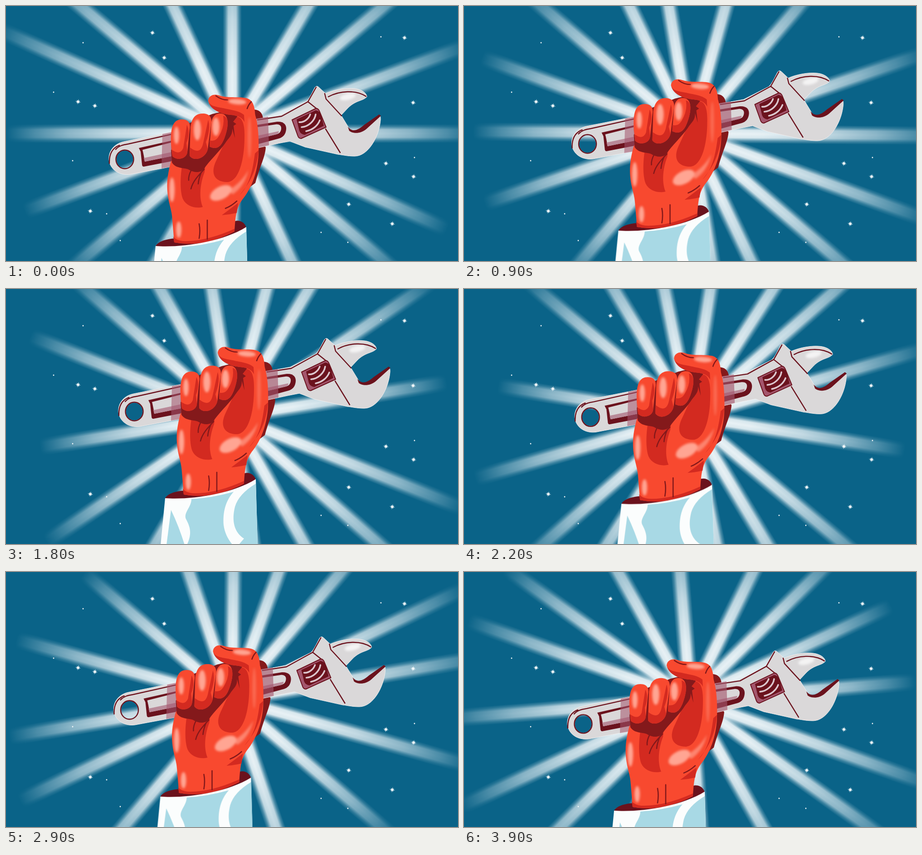
An HTML page for the animation above (4 s loop, 997x562 px).

```html
<!DOCTYPE html>
<html lang="en">
<head>
<meta charset="utf-8">
<title>Raised wrench</title>
<style>
  html, body { margin: 0; width: 100%; height: 100%; overflow: hidden; background: #0a6388; }
  svg { display: block; width: 997px; height: 562px; }
  .steel { fill: #dad8d9; }
  .ink { fill: #6b121d; }
  .line { fill: none; stroke: #6b121d; stroke-width: 2.4; stroke-linecap: round; stroke-linejoin: round; }
  .mauve { fill: #a4566d; }
  .red { fill: #f8492f; }
  .shade { fill: #d32a20; }
  .deep { fill: #84191b; }
  .crease { fill: none; stroke: #84191b; stroke-width: 2.6; stroke-linecap: round; }
  .glow { fill: #ffa593; filter: url(#soft); }
  .cloth { fill: #a8d9e5; }
</style>
</head>
<body>
<svg viewBox="0 0 997 562" xmlns="http://www.w3.org/2000/svg">
  <defs>
    <linearGradient id="beam" x1="0" y1="0" x2="0" y2="1">
      <stop offset="0" stop-color="#eef5f8" stop-opacity="0"/>
      <stop offset=".14" stop-color="#eef5f8" stop-opacity=".34"/>
      <stop offset=".3" stop-color="#eef5f8" stop-opacity=".93"/>
      <stop offset=".5" stop-color="#eef5f8"/>
      <stop offset=".7" stop-color="#eef5f8" stop-opacity=".93"/>
      <stop offset=".86" stop-color="#eef5f8" stop-opacity=".34"/>
      <stop offset="1" stop-color="#eef5f8" stop-opacity="0"/>
    </linearGradient>
    <linearGradient id="fade">
      <stop offset="0" stop-color="#fff"/>
      <stop offset=".28" stop-color="#fff" stop-opacity=".97"/>
      <stop offset=".52" stop-color="#fff" stop-opacity=".82"/>
      <stop offset=".72" stop-color="#fff" stop-opacity=".58"/>
      <stop offset=".87" stop-color="#fff" stop-opacity=".3"/>
      <stop offset="1" stop-color="#fff" stop-opacity="0"/>
    </linearGradient>
    <mask id="reach" x="0" y="0" width="1" height="1" maskContentUnits="objectBoundingBox">
      <rect width="1" height="1" fill="url(#fade)"/>
    </mask>
    <filter id="soft" x="-40%" y="-40%" width="180%" height="180%">
      <feGaussianBlur stdDeviation="2.6"/>
    </filter>
  </defs>

  <rect width="997" height="562" fill="#0a6388"/>
  <g id="rays"></g>
  <g id="stars" fill="#f4f9fb"></g>

  <g id="arm">
    <!-- cuff opening and far side of the palm -->
    <path class="ink" d="M330 529C338 516 360 513 375 512L505 474C518 471 528 479 530 489L500 530L370 540Z"/>
    <path class="deep" d="M542 228C560 227 567 237 567 250V300L573 312C571 335 561 350 550 390L530 405Z"/>

    <!-- wrench handle and fixed jaw -->
    <path class="steel" stroke="#f1efef" stroke-width="1" fill-rule="evenodd"
      d="M227 339C226 318 240 303 260 299L365 278L556 249L606 240L661 212C668 207 674 193 681 180Q685 174 690 179L706 194L740 242L757 270C764 281 779 277 791 266L823 241Q827 242 826 252C823 288 799 331 769 331C752 331 742 328 732 327L660 311L626 298L600 303L365 354L274 371C250 374 230 361 227 339Z
         M281 338A19 20 0 1 0 243 338A19 20 0 1 0 281 338Z"/>
    <ellipse class="line" cx="262" cy="338" rx="19.5" ry="20.5" stroke-width="3"/>
    <path class="line" d="M228 347C227 323 237 312 250 307M242 316C249 308 258 306 270 304L364 283"/>
    <path class="ink" d="M293 313L364 297L366 342L304 354Q300 354 300 349L297 321Z"/>
    <path class="steel" d="M301 317L364 301L365 331L306 343Q304 328 301 317Z"/>
    <path d="M304 335L365 322V331L306 343Z" fill="#b98a99"/>
    <path class="mauve" opacity=".55" d="M345 282L365 278L367 354L343 358Z"/>

    <path class="line" d="M555 251L608 243L666 211"/>
    <path class="ink" d="M554 262L598 255C613 254 619 262 618 272C617 282 612 289 602 292L554 305Z"/>
    <path class="steel" d="M554 267L595 261C604 260 608 265 607 271C606 278 603 281 596 283L554 293Z"/>
    <path d="M554 286L601 276Q604 279 596 283L554 293Z" fill="#b98a99"/>
    <path class="mauve" opacity=".62" d="M552 248L578 244L580 307L552 313Z"/>

    <!-- moving jaw -->
    <path class="steel" stroke="#f1efef" stroke-width="1" d="M704 193C725 184 750 180 769 182C786 184 796 193 796 200C787 210 772 207 754 225L738 242L706 203Z"/>
    <ellipse cx="754" cy="200" rx="18" ry="7" transform="rotate(-14 754 200)" fill="#fff" opacity=".7" filter="url(#soft)"/>
    <path class="line" d="M711 200C735 187 771 184 794 199"/>
    <path class="line" stroke-width="3.4" d="M703 193L706 205L740 242"/>
    <path class="ink" d="M754 266C765 280 777 273 790 262L823 239L827 242L795 271C781 283 764 281 757 275Z"/>
    <path class="line" stroke-width="2" d="M684 179L666 211L686 227M705 271L737 323"/>

    <!-- adjusting screw -->
    <path class="mauve" stroke="#6b121d" stroke-width="2" stroke-linejoin="round" d="M631 251L683 226Q688 225 691 231L706 267L651 292Q646 292 644 287Z"/>
    <path class="ink" d="M641 250L683 230Q692 231 695 240L701 264L659 284Q650 283 647 275Z"/>
    <g fill="none" stroke="#dcc6cd" stroke-width="3.6" stroke-linecap="round">
      <path d="M647 256C658 257 668 248 671 239"/>
      <path d="M652 267C667 266 681 253 683 239"/>
      <path d="M662 276C677 273 688 263 692 252"/>
    </g>

    <!-- palm and wrist -->
    <path class="red" d="M364 342C358 365 353 388 357 417C360 440 366 450 367 472L371 521Q435 533 504 497C506 463 508 445 521 427C542 402 555 366 557 327C558 294 557 260 548 235L530 208L478 232L440 300Z"/>
    <path class="shade" d="M388 354C384 380 384 409 390 425C398 442 419 447 434 443C426 424 427 395 438 366L440 345Z"/>
    <path class="shade" d="M500 246C520 238 527 257 526 290C526 338 514 386 489 388C462 388 448 371 465 338L487 290Z"/>
    <path class="shade" d="M557 318C553 367 535 393 515 417C541 393 546 346 549 325Z"/>
    <path class="shade" d="M512 434L476 461Q492 460 509 456Z"/>
    <path class="shade" d="M369 508L371 521Q435 533 504 497V491Q440 520 390 518Q374 516 369 508Z"/>
    <path class="deep" d="M364 318L366 345C375 359 392 356 402 360C416 369 430 367 436 360C449 340 470 322 483 303C491 290 500 286 499 270L505 291L502 264L508 260L501 255L513 240L480 232L455 238L400 260Z"/>
    <path class="crease" d="M437 360C425 373 412 386 408 403M431 366Q425 380 424 392M409 361Q402 374 403 384"/>
    <path class="crease" stroke-width="2" d="M426 480Q429 495 426 512M444 472V514M509 430Q497 441 484 446"/>

    <!-- fingers -->
    <path class="red" d="M364 306C362 266 369 250 388 250C402 250 408 258 405 273L400 322C398 338 376 341 367 331Z"/>
    <path class="red" d="M407 267C410 243 421 236 437 237C452 239 455 248 452 263L445 316C439 338 413 343 405 330Z"/>
    <path class="red" d="M453 256C456 239 467 234 479 238C490 243 491 259 486 278C479 303 470 320 449 310Z"/>
    <g class="shade">
      <path d="M399 262Q407 278 398 302L400 322C398 338 376 341 367 331L366 317Q384 330 391 313Z"/>
      <path d="M446 251Q452 270 441 300L445 316C439 338 413 343 405 330L406 312Q429 330 435 302Z"/>
      <path d="M479 242Q483 265 470 286Q463 300 449 296V310C470 320 479 303 486 278C491 259 490 245 479 242Z"/>
    </g>

    <!-- thumb -->
    <path class="red" d="M446 209C447 197 458 193 470 197C490 204 512 199 530 203C547 207 549 225 550 246L526 262C521 243 507 241 496 240C474 238 451 229 446 209Z"/>
    <path class="shade" d="M447 211C452 223 468 222 483 226C501 230 514 231 525 240L526 256C521 244 507 241 496 240C474 238 451 229 447 211Z"/>
    <path class="crease" stroke-width="2" d="M463 198Q475 207 489 207M541 211Q535 217 532 226"/>

    <!-- highlights -->
    <g class="glow">
      <ellipse cx="376" cy="285" rx="6" ry="19"/>
      <ellipse cx="422" cy="273" rx="8" ry="23"/>
      <ellipse cx="463" cy="266" rx="8" ry="20"/>
      <ellipse cx="510" cy="211" rx="20" ry="6" transform="rotate(4 510 211)"/>
      <ellipse cx="366" cy="405" rx="6" ry="27"/>
      <ellipse cx="474" cy="412" rx="26" ry="14" transform="rotate(-28 474 412)"/>
      <path d="M490 406Q519 390 535 361Q526 398 500 415Z" opacity=".65"/>
      <ellipse cx="381" cy="493" rx="6" ry="18"/>
      <ellipse cx="537" cy="290" rx="4" ry="45" opacity=".35"/>
    </g>

    <!-- sleeve -->
    <path fill="#fbfdfd" d="M330 529C385 533 475 521 530 487L534 632H320Z"/>
    <path class="cloth" d="M388 531Q435 528 481 515C463 535 457 560 459 588Q462 612 479 632H378C391 606 384 590 376 575C370 561 388 549 388 531Z"/>
    <path class="cloth" d="M530 497L534 632H492L504 618C483 605 476 580 484 548Q492 520 530 497Z"/>
    <path class="cloth" d="M343 555Q360 590 373 632H333Z"/>
  </g>
</svg>
<script>
  const NS = "http://www.w3.org/2000/svg";
  const byId = id => document.getElementById(id);
  const add = (parent, tag, attrs) => {
    const el = parent.appendChild(document.createElementNS(NS, tag));
    for (const key in attrs) el.setAttribute(key, attrs[key]);
  };

  const LOOP = 4000, STEP = 100, PEAK = 1800, HALF = 21;
  const rays = byId("rays"), arm = byId("arm"), stars = byId("stars");

  // Angle, reach of the beam, reach of its opposite; half a turn closes the loop.
  const beams = [[0, 545, 500], [20.5, 560, 490], [40, 570, 480], [59.3, 550, 480],
    [90, 480, 430], [115, 545, 495], [140, 575, 500], [156, 570, 520]];
  const addBeam = (angle, reach) => add(rays, "rect", {
    y: -HALF, width: reach, height: 2 * HALF, fill: "url(#beam)",
    mask: "url(#reach)", transform: `rotate(${-angle})`
  });
  for (const [angle, reach, opposite] of beams) {
    addBeam(angle, reach);
    addBeam(angle + 180, opposite);
  }

  const starPath = (x, y, r) => {
    let d = "";
    for (let i = 0; i < 16; i++) {
      const a = i * Math.PI / 8 + 0.2;
      const k = i % 2 ? r * 0.36 : i % 4 ? r * 0.8 : r;
      d += (i ? "L" : "M") + (x + k * Math.cos(a)).toFixed(1) + " " + (y + k * Math.sin(a)).toFixed(1);
    }
    return d + "Z";
  };
  const big = [[323, 59], [349, 114], [159, 211], [196, 220], [186, 452], [879, 70],
    [898, 213], [838, 347], [899, 376], [756, 437], [852, 480]];
  const small = [[170, 81], [105, 190], [147, 341], [222, 458], [252, 517],
    [827, 68], [901, 334], [695, 499], [754, 521]];
  for (const [x, y] of big) add(stars, "path", { d: starPath(x, y, 6.2) });
  for (const [x, y] of small) add(stars, "circle", { cx: x, cy: y, r: 1.4 });

  const start = performance.now();
  function draw(now) {
    const t = Math.floor(Math.max(0, now - start) % LOOP / STEP) * STEP;
    const lift = t < PEAK ? t / PEAK : (LOOP - t) / (LOOP - PEAK);
    rays.setAttribute("transform", `translate(499 281) rotate(${180 * t / LOOP})`);
    arm.setAttribute("transform", `translate(${21 * lift} ${-68 * lift})`);
    requestAnimationFrame(draw);
  }
  draw(start);
</script>
</body>
</html>
```
